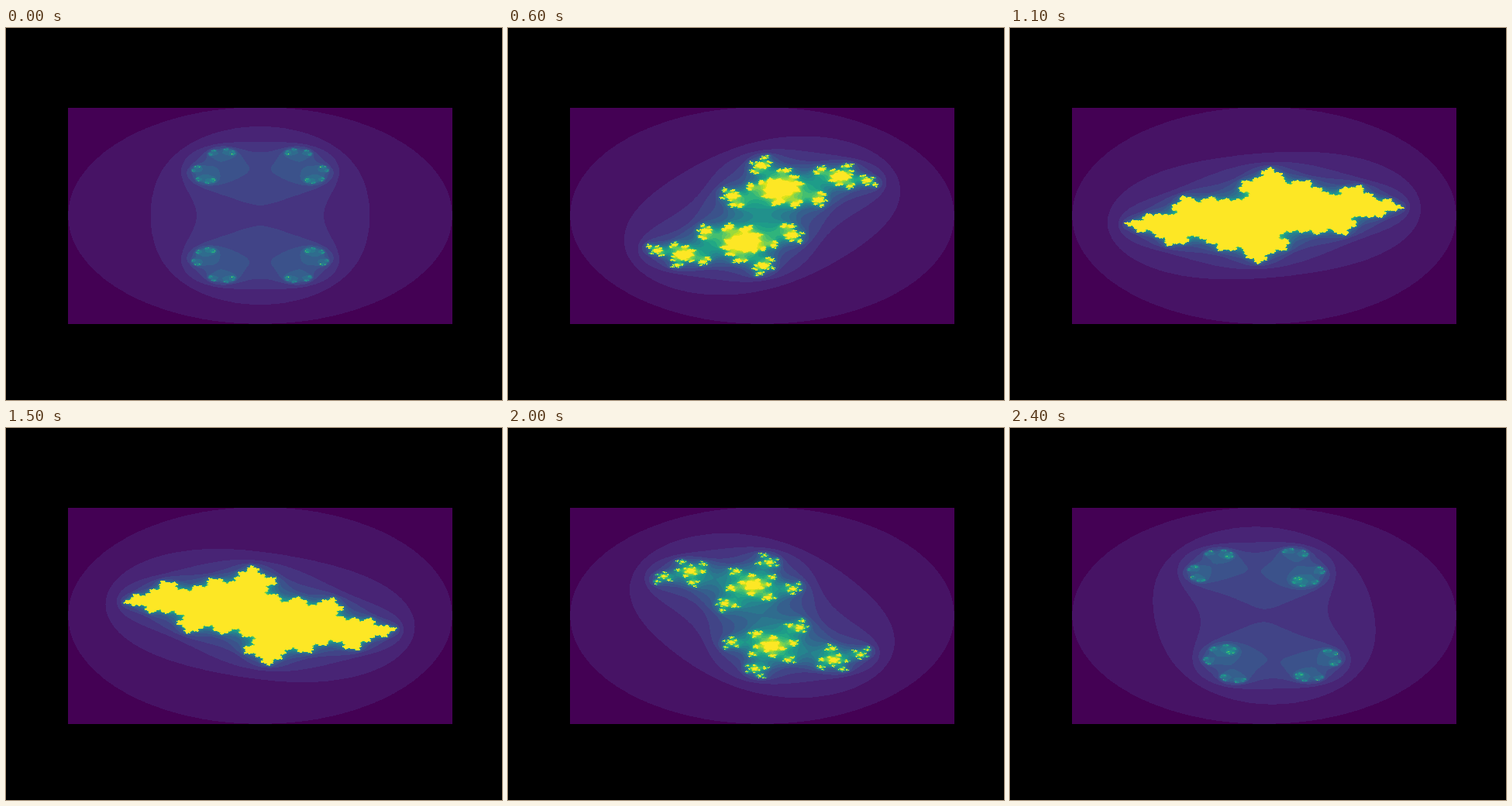
Recreate the animation shown at these times as an HTML page with a canvas. Size 640 by 480 pixels, loop 2500 ms.

```html
<!DOCTYPE html>
<html lang="en">
<head>
<meta charset="utf-8">
<title>Julia set sweep</title>
<style>
  html, body { margin: 0; width: 100%; height: 100%; overflow: hidden; background: #000; }
  canvas { display: block; }
</style>
</head>
<body>
<canvas id="stage" width="640" height="480"></canvas>
<script>
const STEPS = 25, STEP_MS = 100, RADIUS = 0.7, MAX_ITER = 20;
const LEFT = 80, TOP = 102, COLS = 496, ROWS = 280;

// One viridis colour per iteration count, 0 to MAX_ITER.
const palette = ("440154 471365 482475 463480 414487 3b528b 355f8d 2f6c8e 2a788e 25848e 21918c " +
  "1e9c89 22a884 2fb47c 44bf70 5ec962 7ad151 9bd93c bddf26 dfe318 fde725")
  .split(" ")
  .map(hex => {
    const rgb = parseInt(hex, 16);
    return (255 << 24 | (rgb & 255) << 16 | (rgb & 0xff00) | rgb >> 16) >>> 0;
  });

// Nearest sample of a fine grid that spans -2 to 2.
const axis = (cells, gridSize) => Float64Array.from({ length: cells }, (_, i) =>
  -2 + 4 * Math.floor((i + 0.5) * gridSize / cells) / (gridSize - 1));
const xs = axis(COLS, 1920), ys = axis(ROWS, 1080);

function escapeCount(x, y, cx, cy) {
  let n = 0;
  while (n < MAX_ITER && x * x + y * y <= 4) {
    const nextX = x * x - y * y + cx;
    y = 2 * x * y + cy;
    x = nextX;
    n++;
  }
  return n;
}

function renderJulia(step) {
  const angle = 2 * Math.PI * step / STEPS;
  const cx = RADIUS * Math.cos(angle), cy = RADIUS * Math.sin(angle);
  const image = new ImageData(COLS, ROWS);
  const pixels = new Uint32Array(image.data.buffer);
  for (let row = 0, p = 0; row < ROWS; row++)
    for (let col = 0; col < COLS; col++)
      pixels[p++] = palette[escapeCount(xs[col], ys[row], cx, cy)];
  return image;
}

const ctx = document.getElementById("stage").getContext("2d");
const cache = [];
const start = performance.now();
let shown = -1;

function draw() {
  const step = Math.floor((performance.now() - start) / STEP_MS) % STEPS;
  if (step !== shown) {
    cache[step] ||= renderJulia(step);
    // The top row falls outside the plot area.
    ctx.putImageData(cache[step], LEFT, TOP, 0, 1, COLS, ROWS - 1);
    shown = step;
  }
  requestAnimationFrame(draw);
}
draw();
</script>
</body>
</html>
```
